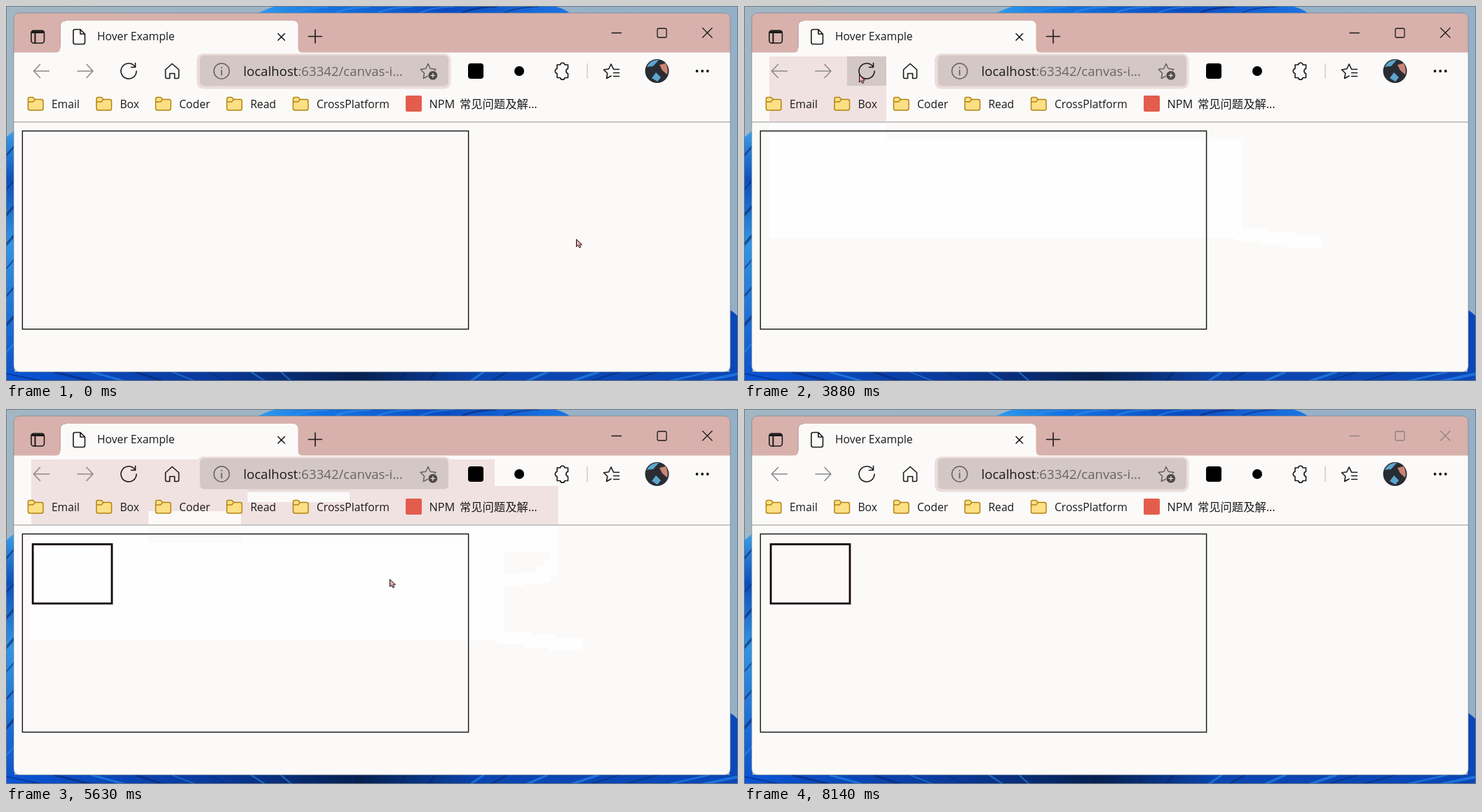
Recreate the animation shown at these times as an HTML page. Size 1044x536 px, loop 8.24 s.

```html
<!DOCTYPE html>
<html lang="en">
<head>
<meta charset="utf-8">
<title>Hover Example</title>
<style>
  html, body { margin: 0; width: 100%; height: 100%; overflow: hidden; background: #9fb5c7; }
  svg { display: block; width: 1044px; height: 536px; }
  text { font: 15.7px "Open Sans", "Noto Sans", "Noto Sans CJK SC", "Noto Sans CJK", sans-serif; fill: #1b1a1a; white-space: pre; }
  .url { font-size: 18.6px; }
  .wide { font-size: 16.3px; }
  .line { fill: none; stroke: #1b1a1a; stroke-width: 1.6; stroke-linecap: round; stroke-linejoin: round; }
  .dim { stroke: #8d8b8a; }
  .grey { stroke: #686261; stroke-width: 1.5; }
  .thin { stroke-width: 1.3; }
</style>
</head>
<body>
<svg viewBox="0 0 1044 536">
  <defs>
    <linearGradient id="sky"><stop stop-color="#a2b6c4"/><stop offset="1" stop-color="#94b0c8"/></linearGradient>
    <linearGradient id="top">
      <stop stop-color="#2f9bee"/><stop offset=".2" stop-color="#1575e2"/><stop offset=".6" stop-color="#0a4bc3"/><stop offset="1" stop-color="#1b76e4"/>
    </linearGradient>
    <linearGradient id="left" x2="0" y2="1">
      <stop stop-color="#3aa0ea"/><stop offset=".2" stop-color="#0b4fbd"/><stop offset=".45" stop-color="#3096e6"/><stop offset="1" stop-color="#0b50cc"/>
    </linearGradient>
    <linearGradient id="foot">
      <stop stop-color="#0b55d6"/><stop offset=".3" stop-color="#0a3796"/><stop offset=".48" stop-color="#06204f"/><stop offset=".65" stop-color="#0b45b0"/><stop offset="1" stop-color="#0a47b8"/>
    </linearGradient>
    <clipPath id="win"><rect x="11" y="10" width="1022" height="513" rx="8"/></clipPath>
    <clipPath id="bar"><rect y="67" width="1044" height="98"/></clipPath>
    <clipPath id="page"><rect y="167" width="1044" height="356"/></clipPath>
    <g id="folder">
      <path d="M1 3.500Q1 1 3.500 1H8L11 4H20Q22.500 4 22.500 6.500V17Q22.500 19.500 20 19.500H3.500Q1 19.500 1 17Z" fill="#fddf85" stroke="#b38410" stroke-width="1.500"/>
      <path d="M1 7.500H8L11 4" fill="none" stroke="#b38410" stroke-width="1.400"/>
    </g>
  </defs>

  <rect width="1044" height="536" fill="url(#sky)"/>
  <path d="M360 10Q374 3 386 0H780Q795 3 804 10Z" fill="url(#top)"/>
  <path d="M0 188L12 178V536H0Z" fill="url(#left)"/>
  <rect y="523" width="1044" height="13" fill="url(#foot)"/>
  <path d="M1032 434Q1040 439 1044 444V536H1032Z" fill="#0a48ba"/>
  <g id="folds" fill="none" stroke-opacity=".6"></g>

  <g clip-path="url(#win)">
    <rect x="11" y="10" width="1022" height="513" fill="#fbfaf9"/>
    <rect x="11" y="10" width="1022" height="56.500" fill="#d8b1ac"/>
    <path d="M70 67Q77.500 67 77.500 59V29Q77.500 21 85.500 21H408.500Q416.500 21 416.500 29V59Q416.500 67 424 67Z" fill="#fbfaf9"/>
    <path d="M77.300 59V29Q77.300 21 85 21" fill="none" stroke="#b99a96"/>
    <path d="M11 165.800H1033" stroke="#a9a8a7" stroke-width="1.300"/>
    <rect x="272" y="68" width="362.500" height="50.500" rx="9" fill="#ecdddb"/>
    <g id="pink" clip-path="url(#bar)" fill="#f0e2e1"></g>
    <g id="white" clip-path="url(#page)" fill="#fefefe"></g>
    <g id="buttons" fill="#d3c8c6">
      <rect x="276.500" y="70.500" width="354.500" height="44" rx="6"/>
    </g>

    <g class="line">
      <rect x="36" y="35" width="18.500" height="18" rx="3.500"/>
      <path d="M37.500 37.300H53" stroke-width="3.600"/>
      <path d="M41.500 38V53" stroke-width="2"/>
      <path d="M96 36Q96 33.500 98.500 33.500H106L112.500 40V52Q112.500 54.500 110 54.500H98.500Q96 54.500 96 52ZM106 34V40H112"/>
      <path d="M388 39.500L397.500 49M397.500 39.500L388 49M431.500 43.500H450.500M441 34V53"/>
      <path d="M183.500 86A11 11 0 1 0 186 93M184.500 81.500V87.500H178.500"/>
      <path d="M227.500 91L237 82.500L246.500 91V101.500Q246.500 103.500 244.500 103.500H240.500V96.500H233.500V103.500H229.500Q227.500 103.500 227.500 101.500Z"/>
      <path d="M786 84H790.500A3.300 3.300 0 0 1 797 84H801.500V89.500A3.600 3.600 0 0 0 801.500 96.500V102.500H797A3.300 3.300 0 0 1 790.500 102.500H786V96.500A3.600 3.600 0 0 1 786 89.500Z"/>
      <path d="M874.500 90.500H866.500L863 83L859.700 90L852.500 91L857.800 96.200L856.500 103.500L863 100M866.500 95.500H874.500M866.500 100.500H874.500"/>
    </g>
    <g id="controls" class="line thin">
      <path d="M864 38.500H877.500M993.500 31.500L1007 45M1007 31.500L993.500 45"/>
      <rect x="929" y="32" width="13" height="13" rx="2"/>
    </g>
    <path class="line dim" d="M61.500 93H39.500M48.500 83.500L39.500 93L48.500 102.500M102 93H124M115 83.500L124 93L115 102.500"/>
    <g class="line grey">
      <circle cx="307.500" cy="93" r="11"/>
      <path d="M307.500 92V98.500M307.500 88V88.200" stroke-width="1.800"/>
      <path d="M602 82.500L605.200 89.500L613 90.500L607.500 96L609 103.500L602 100L595.200 103.500L596.600 96L591.200 90.500L598.800 89.500Z"/>
    </g>
    <circle cx="608.800" cy="99.300" r="6.800" fill="#4d4948" stroke="#d3c8c6"/>
    <path d="M605.500 99.300H612M608.800 96V102.500" stroke="#e6dedd" stroke-width="1.300"/>
    <rect x="659" y="82" width="22" height="22" rx="4"/>
    <circle cx="732" cy="93" r="7"/>
    <path d="M829 82V104" stroke="#c9c6c5" stroke-width="1.300"/>
    <circle cx="928.500" cy="93" r="17" fill="#2a2c33"/>
    <path d="M914 87Q920 76 931 77L923 86ZM921 103L927 95L934 102L929 108Z" fill="#5ba6ce"/>
    <path d="M932 84L941 82Q945 90 943 98L936 92Z" fill="#c98472"/>
    <path d="M985.500 93H1001" stroke="#111" stroke-width="3.800" stroke-linecap="round" stroke-dasharray="0 7.600"/>

    <text x="130" y="49">Hover Example</text>
    <text class="url" x="338.500" y="100">localhost<tspan fill="#6b6564">:63342/canvas-i...</tspan></text>
    <g id="marks"></g>
    <rect x="570" y="128" width="23" height="23" rx="2" fill="#e35d4c"/>
    <text class="wide" x="603.500" y="145.500">NPM</text>
    <text class="wide" x="647" y="145.500">常见问题及解...</text>

    <rect x="23.400" y="178.600" width="636.200" height="283.300" fill="none" stroke="#111" stroke-width="1.400"/>
    <rect id="box" x="38.200" y="193.300" width="112.800" height="84.700" fill="none" stroke-width="2.800"/>
  </g>
  <rect x="11" y="10" width="1022" height="513" rx="8" fill="none" stroke="#77808a" stroke-opacity=".7"/>
  <rect x=".5" y=".5" width="1043" height="535" fill="none" stroke="#6d7883"/>
  <path id="cursor" d="M.5 .5V11L3 8.800L4.800 12.500L6.800 11.600L5.200 8H8.500Z" fill="#efa9a9" stroke="#1a1212" stroke-linejoin="round"/>
</svg>

<script>
const LOOP = 8240, START = 680, STEP = 132.9;
const GONE = 55, BLUR = 56, LOAD_STEPS = 6;
const $ = id => document.getElementById(id);

function add(parent, tag, attrs, text) {
  const el = document.createElementNS("http://www.w3.org/2000/svg", tag);
  for (const key in attrs) el.setAttribute(key, attrs[key]);
  if (text) el.textContent = text;
  return parent.appendChild(el);
}

// Areas are [left, top, right, bottom]
const inside = ([x, y], [l, t, r, b]) => x > l && x < r && y > t && y < b;
const union = list => [0, 1, 2, 3].map(i => Math[i < 2 ? "min" : "max"](...list.map(a => a[i])));
const addArea = (parent, [x, y, r, b]) => add(parent, "rect", { x, y, width: r - x, height: b - y });
const show = (el, on) => el.setAttribute("visibility", on ? "visible" : "hidden");

const marks = { Email: 30.5, Box: 128, Coder: 212.5, Read: 314, CrossPlatform: 408.5 };
for (const name in marks) {
  add($("marks"), "use", { href: "#folder", x: marks[name], y: 129.5 });
  add($("marks"), "text", { x: marks[name] + 34.4, y: 145.5 }, name);
}

// Wallpaper folds along the edges
let seed = 7;
const rand = () => (seed = seed * 16807 % 2147483647) / 2147483647;
const fold = d => add($("folds"), "path", { d, stroke: rand() < .4 ? "#2a8cee" : "#06256e", "stroke-width": 1 + rand() * 3 });
for (let i = 0; i < 20; i++) {
  const x = 20 + i * 52 + rand() * 30, lean = (x - 520) / 16;
  fold(`M${x + lean} 523L${x - lean} 536`);
  if (i < 8) fold(`M0 ${210 + i * 40 + rand() * 20}l12 -14`);
  if (i < 6) fold(`M${410 + i * 60} 10q16 -8 50 -9`);
}

const canvas = [23, 178, 660, 462], box = [36, 191, 153, 280];
const button = x => [x, 72, x + 56, 114];
const reload = button(147), hoverable = [button(209), button(641)];

// Turning points of the pointer: step, x, y
const turns = [
  [-1, 813, 333], [2, 700, 318], [6, 509, 293], [7, 415, 283], [9, 222, 263], [11, 115, 250], [13, 108, 247],
  [16, 129, 213], [17, 127, 205], [18, 116, 166], [20, 145, 105], [21, 158, 100], [24, 164, 98],
  [26, 332, 101], [27, 335, 133], [28, 490, 177], [29, 660, 110], [30, 778, 191], [31, 777, 216],
  [33, 757, 234], [35, 701, 240], [39, 392, 245], [42, 200, 237], [44, 127, 227], [50, 127, 227],
  [51, 790, 336], [52, 560, 132], [53, 341, 142], [54, 303, 149], [BLUR, 303, 149]
];

function tipAt(step) {
  const i = turns.findIndex(turn => turn[0] >= step);
  const b = turns[i], a = turns[i - 1] || b;
  const k = (step - a[0]) / (b[0] - a[0] || 1);
  return [1, 2].map(j => Math.round(a[j] + (b[j] - a[j]) * k));
}

// Play the page once: hovering, reloading, and the area each step repaints
const frames = [];
let stroke = "none", hot, loadedAt = -1, last = { tip: tipAt(-1) };
for (let step = -1; step <= BLUR; step++) {
  const tip = tipAt(step), dirty = [];
  const wasHot = hot, wasStroke = stroke;
  hot = hoverable.find(b => inside(tip, b));
  if (loadedAt < step && inside(tip, reload)) loadedAt = step + LOAD_STEPS;
  const loading = step < loadedAt;

  if (loading) stroke = "none";
  else if (inside(tip, box)) stroke = "#f80d0d";
  else if (stroke !== "none" || inside(tip, canvas)) stroke = "#140809";

  for (const [x, y] of [last.tip, tip]) dirty.push([x, y, x + 9.5, y + 13]);
  if (stroke !== wasStroke) dirty.push(box);
  if (hot && hot !== wasHot) dirty.push(hot);
  if (loading !== !!last.loading) dirty.push(reload);

  const still = dirty.length === 2 && String(tip) === String(last.tip);
  const patches = still ? [] : ["pink", "white"].map(id => addArea($(id), union(dirty)));
  last = { tip, stroke, hot, loading, patches };
  frames.push(last);
}

const lights = [reload, ...hoverable].map(area => [area, addArea($("buttons"), area)]);

function draw(t) {
  const step = Math.min(BLUR, Math.max(-1, Math.floor((t - START) / STEP)));
  const now = frames[step + 1], blurred = step === BLUR;
  $("cursor").setAttribute("transform", `translate(${now.tip})`);
  show($("cursor"), step < GONE);
  $("box").setAttribute("stroke", now.stroke);
  $("controls").style.stroke = blurred ? "#94807d" : "#1b1a1a";
  for (const [area, el] of lights) show(el, area === reload ? now.loading : area === now.hot);
  frames.forEach((frame, i) => {
    for (const el of frame.patches) show(el, i <= step + 1 && !blurred);
  });
}

const start = performance.now();
function tick() {
  draw((performance.now() - start) % LOOP);
  requestAnimationFrame(tick);
}
tick();
</script>
</body>
</html>
```
